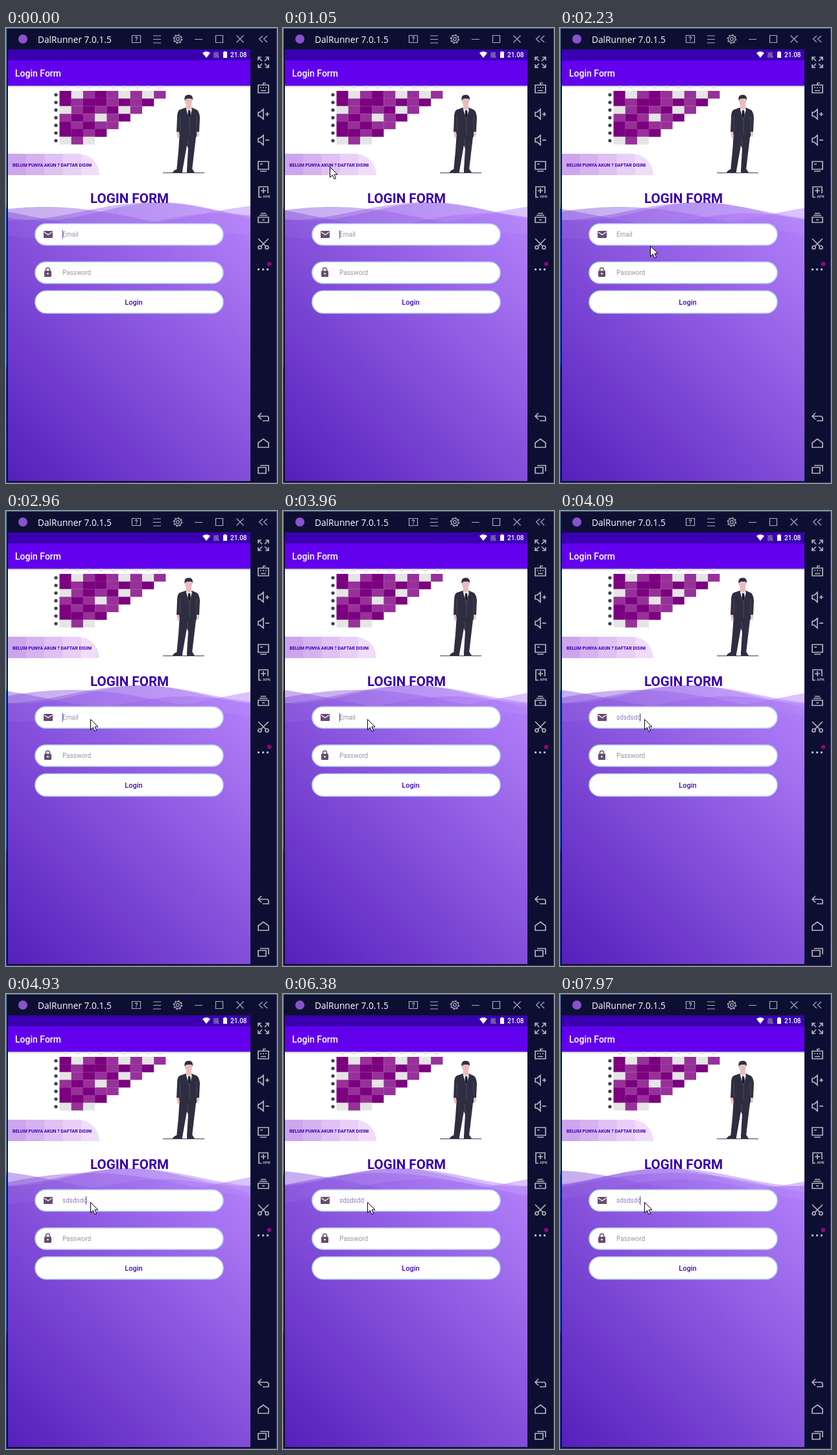
An HTML page that plays this animation: 418x702 px, repeating every 8000 ms.

```html
<!DOCTYPE html>
<html lang="id">
<head>
<meta charset="utf-8">
<title>Login Form</title>
<style>
html, body { margin: 0; width: 100%; height: 100%; overflow: hidden; background: #0d0f32; }
svg { display: block; width: 418px; height: 702px; font-family: Roboto, sans-serif; }
.line { fill: none; stroke: #a9abb9; stroke-width: 1.2; }
.side .line { stroke: #b4b4be; stroke-width: 1.7; }
.solid { fill: #b4b4be; }
.field { fill: #fff; stroke: #b9d6f6; stroke-width: 1.6; }
.hint { font-size: 10px; fill: #9b94a5; }
.icon { fill: #674d70; }
.black, .hint-email, .typed, .caret, .pointer { animation: 8s infinite step-end; }
.black { animation-name: black; }
.hint-email { animation-name: untilTyped; }
.typed { animation-name: afterTyped; }
.caret { animation: blink 1s infinite step-end; }
.shift { animation: shift 8s infinite step-end; }
.pointer { animation: move 8s infinite linear; }
@keyframes black { 0%, 51.125%, 100% { opacity: 0 } 50.75% { opacity: 1 } }
@keyframes untilTyped { 0% { opacity: 1 } 51.125%, 100% { opacity: 0 } }
@keyframes afterTyped { 0% { opacity: 0 } 51.125%, 100% { opacity: 1 } }
@keyframes shift { 0% { transform: none } 51.125%, 100% { transform: translateX(36px) } }
@keyframes blink { 0%, 68% { opacity: 1 } 18% { opacity: 0 } }
@keyframes move {
  0%, 0.87% { transform: translate(365px, 310px); opacity: 0 }
  0.88% { transform: translate(365px, 310px); opacity: 1; animation-timing-function: ease-in }
  5% { transform: translate(262px, 262px); animation-timing-function: ease-out }
  10.75%, 22.75% { transform: translate(72px, 214px); animation-timing-function: ease-in-out }
  27.875% { transform: translate(139px, 336px); animation-timing-function: ease-out }
  32.5%, 100% { transform: translate(130px, 321px); opacity: 1 }
}
</style>
</head>
<body>
<svg viewBox="0 0 418 702">
  <defs>
    <linearGradient id="violet" gradientUnits="userSpaceOnUse" x1="-11" y1="685" x2="391" y2="283">
      <stop stop-color="#4c13b7"/><stop offset="1" stop-color="#b27dfc"/>
    </linearGradient>
    <linearGradient id="edge" x2="0" y2="1">
      <stop stop-color="#5d93b5"/><stop offset=".39" stop-color="#82a9c6"/>
      <stop offset=".4" stop-color="#0a5fd0"/><stop offset=".74" stop-color="#1479e2"/>
      <stop offset=".75" stop-color="#163e9c"/><stop offset="1" stop-color="#163e9c"/>
    </linearGradient>
    <linearGradient id="shade" x2="0" y2="1">
      <stop stop-color="#000" stop-opacity=".28"/><stop offset="1" stop-color="#000" stop-opacity="0"/>
    </linearGradient>
    <clipPath id="screen"><path d="M3 33H377V699H3z"/></clipPath>
    <clipPath id="tab"><path d="M3 194H111A33 33 0 0 1 144 227H3z"/></clipPath>
  </defs>

  <!-- window frame -->
  <path fill="#0d0f32" d="M0 0H418V702H0z"/>
  <path fill="url(#edge)" d="M0 0H1V702H0z"/>
  <path fill="#3f7194" d="M0 0H418V1H0z"/>
  <path fill="#39406a" d="M417 0H418V702H417zM0 701H418V702H0z"/>
  <circle cx="26" cy="17" r="7" fill="#8a52cc"/>
  <text x="49" y="22.5" fill="#fff" font-size="13.7" font-family="Open Sans, sans-serif">DalRunner 7.0.1.5</text>
  <g class="line">
    <path d="M194.5 11.5H207.5V22.5H194.5zM227 12H239M227 17.5H239M227 23H239M291 17.5H303M323.5 11.5H334.5V22.5H323.5zM355.500 11.500L366.500 22.500M366.500 11.500L355.500 22.500M396 12L390.500 17L396 22M403 12L397.500 17L403 22"/>
    <circle cx="265" cy="17" r="2.300"/>
    <circle cx="265" cy="17" r="5.300"/>
    <circle cx="265" cy="17" r="6.600" stroke-width="1.500" stroke-dasharray="2.600 2.580"/>
  </g>
  <text x="201" y="20.500" text-anchor="middle" font-size="10" font-weight="700" fill="#a9abb9">?</text>

  <!-- side bar -->
  <g class="side">
    <g class="line">
      <path d="M389 50V45H394M389 45L395 51M400 45H405V50M405 45L399 51M389 56V61H394M389 61L395 55M405 56V61H400M405 61L399 55"/>
      <path d="M389 88H405V100H389zM397 88V85H401M392 92H394M396 92H398M400 92H402M393 96.500H401"/>
      <path id="speaker" d="M389 130H392L397 125.500V140.500L392 136H389z"/>
      <path d="M400 133H406M403 130V136"/>
      <use href="#speaker" y="40"/>
      <path d="M400 173H406"/>
      <path d="M389 206H405V218H389zM392 221H402M392 210H396"/>
      <path d="M394 261H390V245H404V255M397 247V255M393 251H401"/>
      <path d="M389 292H405V300H389zM391 289H403M393 286H401M395 296H399"/>
      <path d="M389 325L401 337M405 325L393 337"/>
      <circle cx="391.500" cy="338.500" r="2.500"/><circle cx="402.500" cy="338.500" r="2.500"/>
      <path d="M394 594L389 599L394 604M389 599H402Q405 599 405 602V606H396"/>
      <path d="M389 647V640L397 634L405 640V647z"/>
      <path d="M389 678H401V687H389zM392 675H405V684"/>
    </g>
    <text class="solid" x="396" y="262" font-size="6" font-weight="700">APK</text>
    <path class="solid" d="M388 371H391V374H388zM395 371H398V374H395zM402 371H405V374H402z"/>
    <circle cx="406" cy="364" r="3.200" fill="#8d0878"/>
  </g>

  <!-- app -->
  <g clip-path="url(#screen)">
    <path fill="#fff" d="M3 33H377V699H3z"/>
    <g id="waves" fill="url(#violet)" fill-opacity=".45"></g>
    <path fill="url(#shade)" d="M3 89H377V92H3z"/>
    <path fill="#3a00b0" d="M3 33H377V50H3z"/>
    <path fill="#6200ee" d="M3 50H377V89H3z"/>
    <text x="14" y="75" font-size="14" font-weight="500" fill="#fff">Login Form</text>

    <g id="chart"></g>

    <!-- standing man -->
    <path stroke="#3f3d56" d="M242 223.500H306"/>
    <g fill="#2f2e41">
      <path d="M268 160H294L291 185L287 219H279L281 186L279 181L272 221H263L266 190z"/>
      <path d="M263 218L272 219V223H257Q258 220 263 218zM279 217H287L291 223H279z"/>
      <path d="M277 123L268 126Q264 128 264 138L263 161L267 164V168H294V164L298 160L299 138Q298 128 294 126L287 123z"/>
    </g>
    <path fill="#e9bcbc" d="M278 116H286V124L282 129L278 124zM263 160H267L268 167L265 170zM294 160H298L297 168L294 166z"/>
    <ellipse cx="281.500" cy="112" rx="5.600" ry="7.500" fill="#e9bcbc"/>
    <path fill="#2f2e41" d="M275.500 112Q274 103 282 103Q289 103 288 112Q287 108 283 109Q278 108 275.500 112z"/>
    <path fill="#f2f0f5" d="M278 123L282 127L286 123L287 127L283 140L278 127z"/>
    <path fill="#171622" d="M281 127H284L285 136L283 140L281 136z"/>
    <path fill="none" stroke="#55536b" stroke-width=".7" d="M278 126L283 142V164M287 126L283 142M268 136L269 158M294 136V158M281 182L280 170"/>

    <g id="bands" clip-path="url(#tab)"></g>
    <text x="10" y="213.500" font-size="7" font-weight="700" fill="#4100b4" id="join">BELUM PUNYA AKUN ? DAFTAR DISINI</text>
    <text x="190.500" y="270" text-anchor="middle" font-size="20.600" font-weight="700" fill="#3700b3">LOGIN FORM</text>

    <rect class="field" x="45" y="302" width="290" height="33" rx="16.500"/>
    <rect class="field" x="45" y="361" width="290" height="33" rx="16.500"/>
    <rect class="field" x="45" y="405.500" width="290" height="34.500" rx="17.250"/>
    <rect class="icon" x="58" y="313" width="14" height="11" rx="1.300"/>
    <path fill="none" stroke="#fff" stroke-width="1.300" d="M59 315L65 319L71 315"/>
    <rect class="icon" x="59" y="374.500" width="11" height="9.500" rx="1.300"/>
    <path fill="none" stroke="#674d70" stroke-width="1.500" d="M61.500 375V373Q61.500 370 64.500 370Q67.500 370 67.500 373V375"/>
    <circle cx="64.500" cy="379" r="1.300" fill="#fff"/>
    <text class="hint hint-email" x="87" y="322">Email</text>
    <text class="hint typed" x="87" y="322" font-size="9.700" style="fill:#9080ba">sdsdsdd</text>
    <g class="shift"><path class="caret" stroke="#5d4aa5" d="M87.500 312V325"/></g>
    <text class="hint" x="87" y="381">Password</text>
    <text x="197" y="427" text-anchor="middle" font-size="11" font-weight="500" fill="#4008b5">Login</text>

    <path class="black" d="M3 33H377V699H3z"/>
    <g fill="#fff">
      <path d="M303 38.500Q309 34 315 38.500L309 46z"/>
      <path fill="#8d84a5" opacity=".6" d="M323 37H328V46H320V40z"/>
      <path stroke="#8d84a5" d="M320 37L329 46"/>
      <path d="M335 37H336.500V36H339.500V37H341V46H335z"/>
      <text x="346" y="45" font-size="10" font-weight="500">21.08</text>
    </g>
  </g>

  <path class="pointer" fill="#fff" stroke="#000" d="M.5 .5V16.500L4.300 13L7 19L9.500 18L7 12H12z"/>
</svg>
<script>
const NS = "http://www.w3.org/2000/svg";
const add = (parent, tag, attrs) => {
  const node = document.createElementNS(NS, tag);
  for (const key in attrs) node.setAttribute(key, attrs[key]);
  return document.getElementById(parent).appendChild(node);
};

// D: dark, M: medium, G: grey
const shades = { D: "#7b007f", M: "#98309a", G: "#e5e5e5" };
const rows = ["DGMDMGMGM", "DMDDMDMD", "GMDMDGM", "MDMGMD", "DMDMM", "DDMD", "GMG"];
rows.forEach((row, r) => {
  const y = 97 + r * 11.8;
  add("chart", "circle", { cx: 77, cy: y + 6, r: 2.6, fill: "#3f3d56" });
  [...row].forEach((cell, c) => add("chart", "rect",
    { x: 82.5 + c * 18.2, y, width: 18.3, height: 11.9, fill: shades[cell] }));
});
for (let c = 0; c < 9; c++)
  add("chart", "circle", { cx: 92 + c * 18.2, cy: 91.3, r: 2.4, fill: "#e3e1e6" });

["#cda5ee", "#d5b2f0", "#dfc1f4", "#e8cff7", "#f1dcfa"].forEach((fill, i) =>
  add("bands", "rect", { x: 3 + i * 28.2, y: 194, width: 28.7, height: 33, fill }));

// crest position, wavelength, top, amplitude, speed in px/s
const waves = [
  [330, 524, 286, 19.6, -18],
  [-100, 524, 272, 17, 10.5],
  [225, 430, 269, 14, -7],
  [60, 636, 276, 21, 14],
  [240, 374, 269, 14, -10.5]
].map(([crest, length, top, amp, speed]) =>
  ({ crest, length, top, amp, speed, path: add("waves", "path", {}) }));

function draw(now) {
  const t = now / 1000 % 8;
  for (const { crest, length, top, amp, speed, path } of waves) {
    let d = "M3 699";
    for (let x = 3; x <= 379; x += 4) {
      const phase = 2 * Math.PI * (x - crest - speed * t) / length;
      d += `L${x} ${(top + amp * (1 - Math.cos(phase))).toFixed(2)}`;
    }
    path.setAttribute("d", d + "V699z");
  }
  requestAnimationFrame(draw);
}
draw(performance.now());
</script>
</body>
</html>
```
